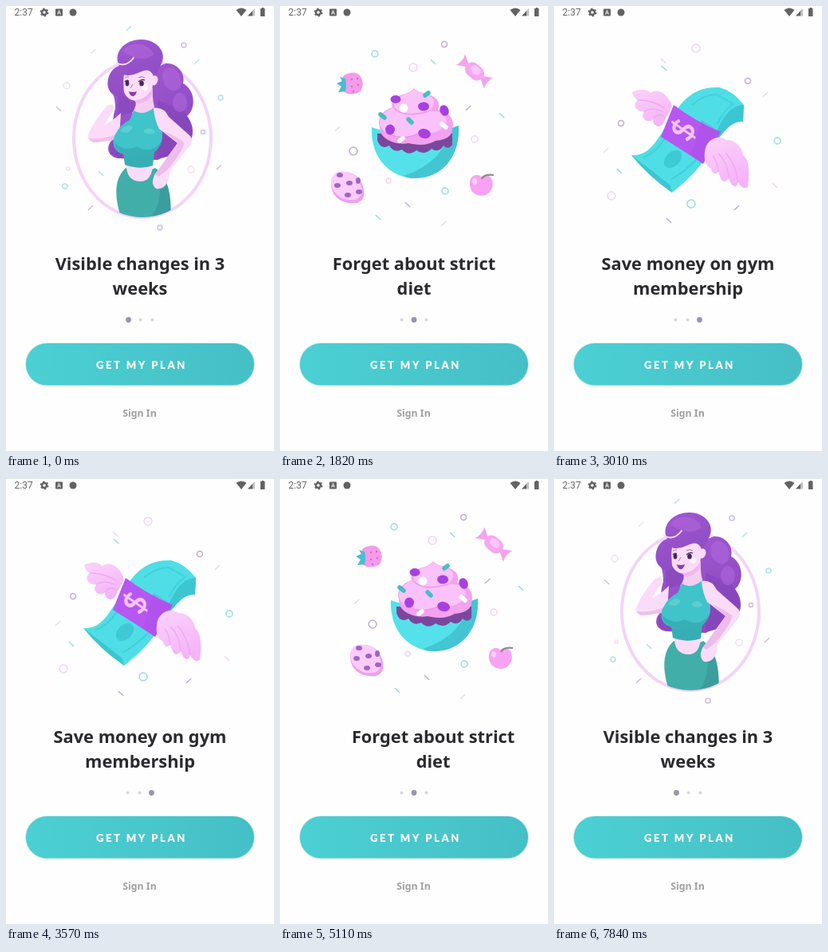
Recreate the animation shown at these times as an HTML page. Size 336 px wide and 558 px high, loop 7910 ms.

```html
<!DOCTYPE html>
<html lang="en">
<head>
<meta charset="utf-8">
<title>Onboarding</title>
<style>
html, body { margin: 0; width: 100%; height: 100%; overflow: hidden; background: #fefefe; }
svg { display: block; width: 336px; height: 558px; }
.title { font: 700 21.8px "Noto Sans", sans-serif; fill: #2b2a2f; text-anchor: middle; }
.cta { font: 900 13px Lato, sans-serif; letter-spacing: 2.6px; fill: #fff; }
.sign { font: 700 12.3px "Noto Sans", sans-serif; fill: #a0a0a2; text-anchor: middle; }
.clock { font: 12px Roboto, sans-serif; fill: #666; }
.confetti { fill: none; stroke-width: 1.5; stroke-linecap: round; opacity: .85; }
.faint { opacity: .65; }
</style>
</head>
<body>
<svg viewBox="0 0 336 558">
<defs>
  <linearGradient id="teal"><stop stop-color="#4bd0d3"/><stop offset="1" stop-color="#45bfc6"/></linearGradient>
  <linearGradient id="hair" x2=".6" y2="1"><stop stop-color="#a458d3"/><stop offset="1" stop-color="#8b4bc1"/></linearGradient>
  <linearGradient id="wing" x2=".4" y2="1"><stop stop-color="#fbd3fa"/><stop offset="1" stop-color="#f5b4f8"/></linearGradient>
  <clipPath id="oval"><ellipse cx="171" cy="166" rx="85" ry="99"/></clipPath>
  <clipPath id="bowl"><path d="M115 152Q169 172 224 150C226 190 202 216 170 216S113 190 115 152"/></clipPath>
</defs>

<g class="page">
  <ellipse cx="171" cy="166" rx="86" ry="99" fill="#fefefe" stroke="#f3d4f8" stroke-width="4"/>
  <!-- back hair -->
  <path fill="url(#hair)" d="M150 80L190 79C202 62 227 79 222 97C237 105 239 128 227 138C238 152 236 170 223 179C214 188 200 188 190 193L140 191C126 188 125 175 134 167Q132 145 137 128Q137 117 134 110Z"/>
  <path fill="#7d40b2" opacity=".45" d="M190 118C206 124 224 130 227 138C236 152 234 170 222 178Q206 190 190 190ZM134 166L146 168V190Q124 190 134 166M140 110L164 112V132L140 138Z"/>
  <g fill="#b56be0" opacity=".5">
    <ellipse cx="208" cy="92" rx="11" ry="15" transform="rotate(-25 208 92)"/>
    <ellipse cx="218" cy="121" rx="9" ry="12"/>
  </g>
  <!-- raised arm -->
  <path fill="#fbdcf8" d="M103 161C110 146 120 132 127 125Q136 120 135 130L123 149Q134 144 144 134L142 167L111 171Q101 170 103 161"/>
  <path fill="#f0bdee" d="M104 166Q106 171 113 171L142 167L141 160Q121 168 104 166Z"/>
  <!-- skirt and waist -->
  <g clip-path="url(#oval)">
    <path fill="#42aeaa" d="M150 203Q168 214 187 203Q210 218 206 270H146C137 246 133 219 150 203"/>
    <path fill="#358f91" opacity=".5" d="M188 205Q210 222 206 270H179Q201 240 188 205"/>
  </g>
  <path fill="#fbdcf8" d="M151 197Q167 204 184 196Q184 220 168 220Q150 219 151 197"/>
  <!-- neck and top -->
  <path fill="#f6cdf2" d="M162 112L184 103Q183 124 189 133L175 145L158 134Q165 126 162 112"/>
  <path fill="#37aeb4" d="M147 184L186 183L184 200Q168 206 149 199Z"/>
  <path fill="#40c3c9" d="M160 131Q172 139 186 127C188 141 195 148 196 160Q197 175 185 184Q167 192 148 186C136 183 132 174 136 163Q143 148 155 143Z"/>
  <path fill="#2c9da4" opacity=".5" d="M136 171Q149 184 164 176Q182 187 195 170Q192 181 183 185Q166 192 149 186Q136 182 136 171"/>
  <path fill="#6dd8d8" opacity=".6" d="M143 157Q151 146 159 152Q154 163 143 157M172 157Q180 149 187 158Q179 164 172 157"/>
  <!-- arm on hip -->
  <path fill="#fbdcf8" d="M185 128Q198 126 204 139L231 163Q236 169 230 176L205 207C205 222 198 231 188 229Q181 224 186 212L215 172L192 154Q186 142 185 128"/>
  <path fill="#eebcea" d="M215 172L198 157Q211 162 223 171Q225 177 203 205L191 214L187 211Z"/>
  <!-- face and fringe -->
  <path fill="#fbdcf8" d="M146 85C153 72 180 72 185 87Q192 87 190 95Q187 101 184 99C183 112 168 120 158 118C147 114 144 99 146 85"/>
  <path fill="#f2b7ed" d="M160 118Q175 119 184 102L184 110Q175 124 164 122Z"/>
  <circle cx="174" cy="102" r="4" fill="#fff" opacity=".7"/>
  <path fill="url(#hair)" d="M128 92C130 82 136 77 142 75C134 60 147 42 170 42C189 42 202 58 195 72Q190 84 185 88Q181 77 170 82Q155 89 148 86C146 96 149 106 147 113C135 116 125 106 128 92"/>
  <path fill="#b56be0" opacity=".5" d="M146 57C154 43 181 45 185 61Q169 73 146 57"/>
  <path d="M138 71Q150 78 160 65" fill="none" stroke="#fbdcf8" stroke-width="2" stroke-linecap="round"/>
  <g fill="#46285e"><ellipse cx="152" cy="97" rx="2.4" ry="3.4"/><ellipse cx="170" cy="97" rx="2.8" ry="3.6"/></g>
  <path d="M149 95q2-3 5-1M166 95q4-4 8-2" fill="none" stroke="#46285e" stroke-width="1.2"/>
  <path d="M149 90q3-2 5-1M166 90q4-3 8 0M159 98l-3 5" fill="none" stroke="#a772bd" stroke-width="1"/>
  <path d="M154 107q5 2 10 0q-2 7-6 6q-3-1-4-6" fill="#8a3bb0"/>
  <g class="confetti faint"></g>
  <text class="title"><tspan x="168" y="331">Visible changes in 3</tspan><tspan x="168" y="362">weeks</tspan></text>
</g>

<g class="page">
  <!-- strawberry -->
  <path fill="#f49bea" d="M80 87Q93 80 100 87Q107 96 101 107Q89 114 79 107Q73 98 80 87"/>
  <path fill="#47bfd0" d="M82 91L75 89L78 94L71 97L77 101L73 108L82 107Q84 99 82 91"/>
  <g fill="#d867cf"><circle cx="90" cy="92" r="1.2"/><circle cx="97" cy="91" r="1.2"/><circle cx="90" cy="101" r="1.2"/><circle cx="98" cy="99" r="1.2"/><circle cx="92" cy="107" r="1.2"/></g>
  <!-- candy -->
  <g transform="rotate(40 244 82)">
    <path fill="#f4a4ef" d="M236 82L221 73Q225 82 221 91ZM252 82L267 73Q263 82 267 91Z"/>
    <rect x="231" y="73" width="26" height="18" rx="9" fill="#f7a6f2"/>
    <ellipse cx="244" cy="80" rx="7" ry="5" fill="#fbc6f9"/>
  </g>
  <!-- cookie -->
  <path fill="#ef9fee" d="M65 216Q69 206 82 208Q98 209 104 226Q109 243 96 247Q76 249 67 235Q62 225 65 216"/>
  <path fill="#fbccfa" d="M65 216Q69 206 82 208Q97 209 101 224Q106 239 94 243Q77 245 68 233Q62 225 65 216"/>
  <g fill="#a065c5"><ellipse cx="75" cy="212" rx="4" ry="3"/><ellipse cx="87" cy="222" rx="4" ry="3"/><ellipse cx="72" cy="225" rx="4" ry="3"/><ellipse cx="98" cy="219" rx="3" ry="4"/><ellipse cx="85" cy="237" rx="4" ry="3"/><ellipse cx="99" cy="233" rx="4" ry="3"/></g>
  <!-- cherry -->
  <path fill="#f8a2f4" d="M252 214Q260 209 265 216Q270 228 260 236Q250 241 241 233Q235 223 240 215Q246 209 252 214"/>
  <path d="M253 217Q256 210 268 212" fill="none" stroke="#8b8d86" stroke-width="2.2"/>
  <ellipse cx="244" cy="220" rx="3" ry="4" fill="#fcd1f9"/>
  <!-- cupcake -->
  <g clip-path="url(#bowl)">
    <path fill="#55e1ea" d="M110 145H230V220H110Z"/>
    <path fill="#43c5d2" d="M230 145H214Q211 194 155 213L170 220H230Z"/>
  </g>
  <path fill="#7b479d" d="M122 160H216V174Q211 181 205 175Q199 185 190 179Q181 188 171 181Q161 189 153 180Q143 185 137 175Q126 181 122 168Z"/>
  <path fill="#f3a2ef" d="M125 151C121 139 131 130 141 127C138 117 148 112 158 110Q165 107 168 103Q171 108 184 110C197 114 202 122 198 130C211 132 220 142 216 154C216 165 205 168 195 169C184 176 170 174 161 172C147 175 124 168 125 151"/>
  <path fill="#fbc2fa" d="M126 151C122 139 133 130 144 127C141 116 153 112 160 110Q166 107 168 104Q171 108 182 110C194 114 197 122 187 132Q207 130 209 145C204 157 189 163 177 158C161 169 135 168 126 151"/>
  <path d="M143 128Q155 141 187 132M134 160Q157 170 178 158" fill="none" stroke="#ee95e9" stroke-width="1.6"/>
  <g fill="#a840e0">
    <ellipse cx="145" cy="117" rx="6.5" ry="5"/><ellipse cx="180" cy="126" rx="7" ry="5.5"/><ellipse cx="138" cy="155" rx="6" ry="6.5"/>
    <ellipse cx="181" cy="160" rx="8" ry="6" transform="rotate(15 181 160)"/><ellipse cx="206" cy="131" rx="5.5" ry="7" transform="rotate(-25 206 131)"/>
  </g>
  <g stroke-width="5.5" stroke-linecap="round"><path d="M182 112l4-3M126 136l5 4M161 142l4 4" stroke="#48bdc6"/><path d="M203 148l5 4M150 169l4-3" stroke="#fff"/></g>
  <circle cx="155" cy="128" r="5.5" fill="#fff"/>
  <g class="confetti"></g>
  <text class="title"><tspan x="168" y="331">Forget about strict</tspan><tspan x="168" y="362">diet</tspan></text>
</g>

<g class="page">
  <!-- banknote -->
  <path fill="#4fdee6" d="M97 187C121 189 130 165 146 143C163 112 181 101 207 102Q224 106 238 124L237 145C222 144 212 159 200 174C185 201 171 216 148 234Q118 213 97 187"/>
  <path fill="#3bc6d2" d="M238 124C222 124 211 140 203 160L199 174C214 158 222 143 237 145ZM97 187Q118 213 148 234L146 225Q121 205 97 187"/>
  <path d="M112 190Q129 183 139 166M146 218Q165 207 179 192M173 124Q187 111 204 111L225 123Q211 132 205 148" fill="none" stroke="#42d0da" stroke-width="2"/>
  <ellipse cx="149" cy="192" rx="13" ry="9" transform="rotate(-45 149 192)" fill="#3ecad5"/>
  <path fill="#b657f1" d="M150 124Q178 145 209 158Q197 179 187 198Q160 180 134 164Z"/>
  <path fill="#9e43dd" d="M185 143L209 158L187 198L172 187Z" opacity=".25"/>
  <text transform="translate(163 156) rotate(-60)" y="13" text-anchor="middle" fill="#f8c4fa" font-family="Lato, sans-serif" font-weight="700" font-size="39">$</text>
  <!-- wings -->
  <path fill="url(#wing)" d="M148 126C144 111 130 102 121 109Q112 101 98 108Q99 115 105 118Q99 122 103 129Q109 133 113 132Q109 138 114 143Q121 146 124 142Q124 149 130 151Q136 151 138 145Z"/>
  <path fill="url(#wing)" d="M189 183C190 167 207 160 216 168C225 167 236 176 237 187C244 192 246 207 243 227Q236 231 231 221Q228 230 222 223L219 216Q213 224 209 216L206 208Q199 214 197 204Q187 199 189 183"/>
  <path d="M105 118Q124 118 139 128M113 132Q124 126 137 133M124 142Q129 134 138 138M231 221Q228 198 215 184M219 216Q218 196 206 185M206 208Q205 195 199 188" fill="none" stroke="#f0a8f2" stroke-width="1.4"/>
  <g class="confetti"></g>
  <text class="title"><tspan x="168" y="331">Save money on gym</tspan><tspan x="168" y="362">membership</tspan></text>
</g>

<g id="dots"><circle cy="393.5"/><circle cy="393.5"/><circle cy="393.5"/></g>
<rect x="25" y="423" width="286" height="52.5" rx="26.2" fill="url(#teal)" stroke="#45c0c4" stroke-opacity=".3" stroke-width="1.6"/>
<text class="cta" x="113" y="454.5">GET MY PLAN</text>
<text class="sign" x="167.5" y="515">Sign In</text>

<!-- status bar -->
<text class="clock" x="10.5" y="12.3">2:37</text>
<g fill="#626262">
  <circle cx="48" cy="8" r="3" fill="none" stroke="#626262" stroke-width="2.4"/>
  <circle cx="48" cy="8" r="4.7" fill="none" stroke="#626262" stroke-width="1.4" stroke-dasharray="2.46"/>
  <rect x="62" y="3.5" width="9" height="9" rx="1"/>
  <path d="M64.5 10.5L66.5 5.5L68.5 10.5M65.3 9H67.7" fill="none" stroke="#fff" stroke-width=".9"/>
  <circle cx="84" cy="8" r="4.5"/>
  <path d="M288.5 5Q295 0 301.5 5L295 13ZM309 6V12.5H303Z"/>
  <path d="M312 3V12.5H309V6Z" opacity=".4"/>
  <path d="M320 3h1v-1h2v1h1.5v10H319V3Z"/>
</g>
</svg>
<script>
const LOOP = 7910, PITCH = 339, SLIDE = 700;
const swipes = [[1040, 1], [1990, 1], [3974, -1], [5002, -1]];
const colours = { p: '#b69bd2', c: '#83d6df', k: '#f1cdf0', g: '#e6d5df' };

// Rings are "colour x y radius"; dashes end with a slash showing their slant.
const confetti = [
  'p 223 49 3,c 269 115 3,k 76 100 4,k 78 204 2,c 74 226 3,g 232 205 4,p 247 158 2.5,p 193 278 3,' +
  'c 154 28 /,k 109 57 /,c 239 70 /,p 66 129 \\,c 119 210 \\,p 267 202 /,p 106 253 /',
  'c 119 60 4,p 206 48 3.5,k 167 77 5,p 92 182 5,k 244 167 4,k 136 219 3,c 207 232 4,' +
  'c 192 70 \\,p 236 128 /,c 278 137 \\,g 72 154 /,p 160 249 \\,c 123 265 \\,g 205 273 /',
  'k 178 53 5,p 243 94 3.5,c 280 169 4,p 84 147 3.5,k 72 238 5,c 172 248 5,' +
  'k 137 69 \\,c 138 78 \\,g 265 111 /,k 65 181 /,c 82 207 \\,k 277 225 \\,p 144 269 \\,p 229 253 /'
];

function piece(spec) {
  const [colour, x, y, form] = spec.split(' ');
  const stroke = `stroke="${colours[colour]}"`;
  if (+form) return `<circle cx="${x}" cy="${y}" r="${form}" ${stroke}/>`;
  const slant = form === '/' ? -5 : 5;
  return `<path d="M${x - 2.7} ${y - slant / 2}l5.4 ${slant}" ${stroke}/>`;
}

document.querySelectorAll('.confetti').forEach((group, i) => {
  group.innerHTML = confetti[i].split(',').map(piece).join('');
});

const pages = document.querySelectorAll('.page');
const dots = document.querySelectorAll('#dots circle');

function ease(u) {
  u = Math.min(1, Math.max(0, u));
  return 1 - (1 - u * u) ** 3;
}

function draw() {
  const time = performance.now() % LOOP;
  const position = swipes.reduce((sum, [start, step]) => sum + step * ease((time - start) / SLIDE), 0);
  const current = Math.round(position);
  pages.forEach((page, i) => page.setAttribute('transform', `translate(${(i - position) * PITCH} 0)`));
  dots.forEach((dot, i) => {
    const active = i === current;
    dot.setAttribute('cx', 153 + 15 * i + Math.sign(i - current) * .5 + (active ? .5 - i * .5 : 0));
    dot.setAttribute('r', active ? 3.4 : 2);
    dot.setAttribute('fill', active ? '#9994ae' : '#d9d5df');
  });
  requestAnimationFrame(draw);
}
draw();
</script>
</body>
</html>
```
